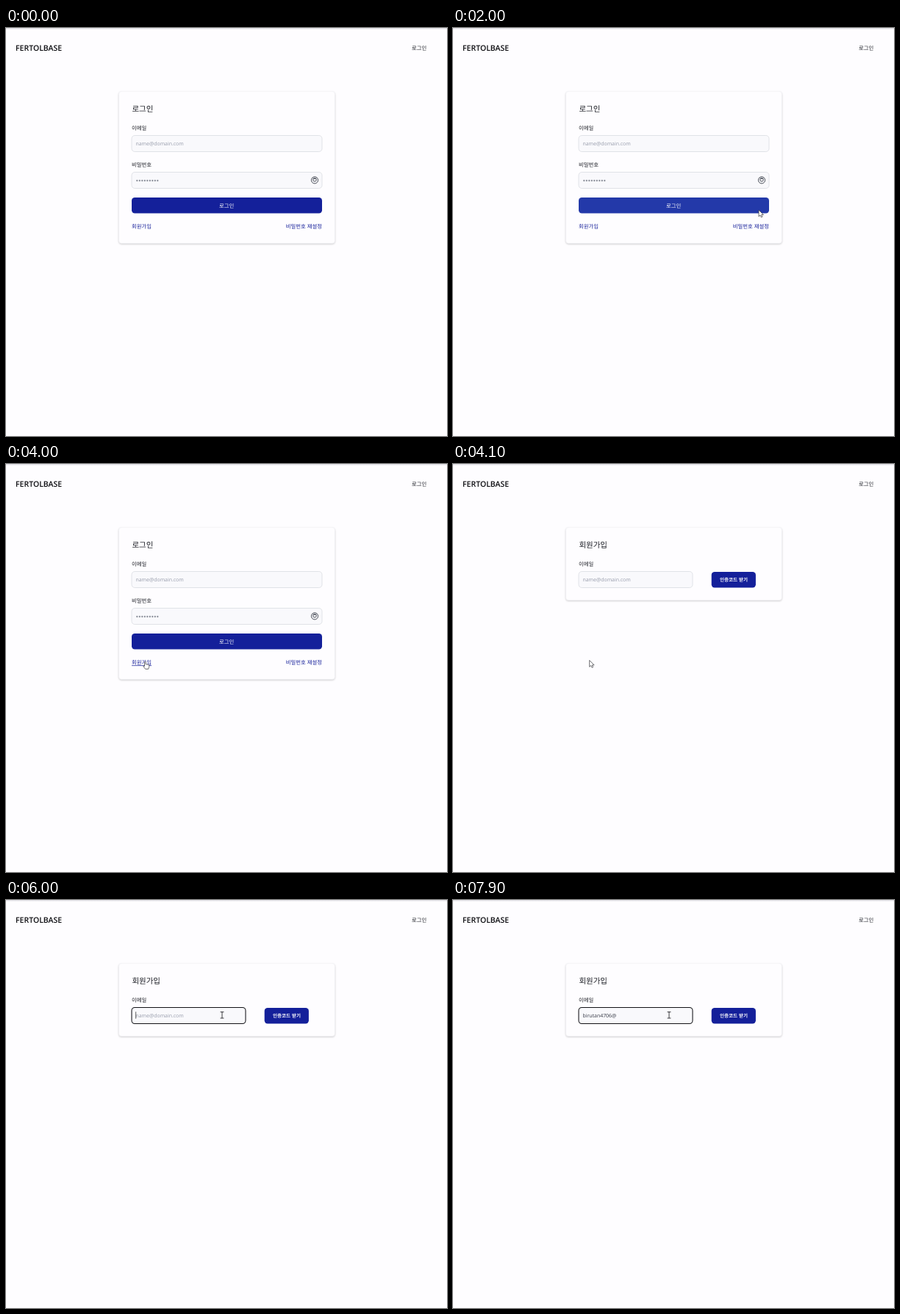
These frames come from a looping animation (600x556 px, 8000 ms). An HTML page:

```html
<!DOCTYPE html>
<html lang="ko">
<head>
<meta charset="utf-8">
<title>로그인</title>
<style>
  html, body { margin: 0; width: 100%; height: 100%; overflow: hidden; background: #fefdff; }
  svg { display: block; width: 100%; height: 100%; }
  text { font: 500 7.35px "Noto Sans CJK KR", "Noto Sans CJK", sans-serif; fill: #1b1d24; text-rendering: geometricPrecision; }
  .brand { font: 600 10.5px "Open Sans", sans-serif; fill: #0c0c10; }
  .nav { font-weight: 400; }
  .title { font-size: 10.5px; font-weight: 400; }
  .latin { font: 400 6.95px "Open Sans", sans-serif; }
  .hint { fill: #979cab; }
  .typed { fill: #343844; }
  .link { fill: #17219a; font-weight: 400; }
  .link.on { text-decoration: underline; }
  .label { fill: #fff; text-anchor: middle; }
  .small { font-size: 6.55px; font-weight: 700; }
  .card { fill: #fefdff; stroke: #ececf0; stroke-width: .5; filter: drop-shadow(0 1px 1.2px rgba(0, 0, 0, .19)); }
  .field { fill: #f9f9fc; stroke: #d6d8df; stroke-width: .7; }
  .field.on { stroke: #111116; stroke-width: 1.05; }
  .button { fill: #14209a; }
  .button.on { fill: #2339a9; }
  .icon { fill: none; stroke: #4c505a; }
  .pointer { fill: #fff; stroke: #3c3c42; stroke-width: .75; stroke-linejoin: round; }
</style>
</head>
<body>
<svg viewBox="0 0 600 556" preserveAspectRatio="none">
  <defs>
    <linearGradient id="edge" x2="0" y2="1">
      <stop stop-color="#dcdbe0"/><stop offset="1" stop-color="#fefdff"/>
    </linearGradient>
  </defs>
  <rect width="600" height="2.5" fill="url(#edge)"/>
  <text class="brand" x="13" y="30.7">FERTOLBASE</text>
  <text class="nav" x="552" y="29.8">로그인</text>

  <g id="login">
    <rect class="card" x="153.5" y="86.3" width="294" height="207.2" rx="4"/>
    <text class="title" x="171.4" y="114.1">로그인</text>
    <text x="171" y="138.8">이메일</text>
    <rect class="field" x="171" y="146.5" width="259" height="22" rx="4.2"/>
    <text class="latin hint" x="176.5" y="159.6">name@domain.com</text>
    <text x="171" y="188.8">비밀번호</text>
    <rect class="field" x="171" y="196.5" width="259" height="22" rx="4.2"/>
    <path d="M178.3 208H207" stroke="#8d919c" stroke-width="2.3" stroke-linecap="round" stroke-dasharray="0 3.5"/>
    <g class="icon">
      <circle cx="420" cy="207.3" r="4.6"/>
      <circle cx="420" cy="206.8" r="2.3"/>
      <path d="M417.7 205.2H422.3"/>
    </g>
    <rect id="submit" class="button" x="171" y="231" width="259" height="21.6" rx="4.2"/>
    <text class="label" x="300.2" y="244.6">로그인</text>
    <text id="join" class="link" x="171" y="273.4">회원가입</text>
    <text class="link" x="430" y="273.4" text-anchor="end">비밀번호 재설정</text>
  </g>

  <g id="signup">
    <rect class="card" x="153.5" y="86.3" width="294" height="99.4" rx="4"/>
    <text class="title" x="171.4" y="114.1">회원가입</text>
    <text x="171" y="138.8">이메일</text>
    <rect id="email" class="field" x="171" y="146.5" width="155" height="22" rx="4.2"/>
    <text id="hint" class="latin hint" x="176.5" y="159.6">name@domain.com</text>
    <text id="typed" class="latin typed" x="176.5" y="159.6"></text>
    <rect id="caret" y="152.3" width=".7" height="9.4" fill="#222"/>
    <rect class="button" x="351.7" y="146.9" width="60.2" height="21.5" rx="4.2"/>
    <text class="label small" x="382" y="160">인증코드 받기</text>
  </g>

  <g id="cursor">
    <path id="arrow" class="pointer" d="M0 0V8.9L2 7.1L3.4 10L4.9 9.3L3.6 6.5H6.4Z"/>
    <path id="hand" class="pointer" transform="translate(3.6 1.3)" d="M-.8 .9Q0-.4 .8 .9V4L4.4 4.6Q5.4 4.8 5.4 5.7V7.6L4.4 10.6H.4L-2.4 7.1Q-2.6 5.7-.8 6.7Z"/>
    <path id="beam" fill="none" stroke="#26262c" stroke-width=".9" d="M-2.4-4.2H2.4M-2.4 4.2H2.4M0-4.2V4.2"/>
  </g>
</svg>
<script>
const $ = id => document.getElementById(id);
const LOOP = 8000, STEP = 100;
const EMAIL = 'birutan4706@';
const ENTER = 1400, HOVER = 3100, JOIN = 4100, FIELD = 4800, FOCUS = 4900;

// stops of the pointer: time, x, y
const STOPS = [
  [ENTER, 555, 278], [2000, 416, 248], [2200, 416, 257], [2400, 265, 258.7], [2700, 100, 282],
  [HOVER, 185.7, 267.5], [JOIN, 185.7, 267.5], [FIELD, 294, 160], [5100, 294, 156.8]
];

const show = (id, on) => { $(id).style.display = on ? '' : 'none'; };
const mark = (id, on) => $(id).classList.toggle('on', on);
const between = (t, a, b) => t >= a && t < b;
const clamp = k => Math.min(1, Math.max(0, k));
const ease = k => k * k * (3 - 2 * k);

function pointerAt(t) {
  let [last, x, y] = STOPS[0];
  for (const [at, nextX, nextY] of STOPS.slice(1)) {
    const k = ease(clamp((t - last) / (at - last)));
    x += (nextX - x) * k;
    y += (nextY - y) * k;
    last = at;
  }
  return [x, y];
}

// characters typed in one burst that begins at start and lasts some steps
const burst = (t, start, steps, chars) =>
  Math.round(chars * clamp((t - start + STEP) / (steps * STEP)));

const typedAt = t =>
  burst(t, 6300, 1, 1) + burst(t, 6500, 4, 6) + burst(t, 7000, 3, 4) + burst(t, 7400, 1, 1);

function draw(t) {
  show('login', t < JOIN);
  show('signup', t >= JOIN);

  const [x, y] = pointerAt(t);
  const overLink = between(t, HOVER, JOIN), overField = t >= FIELD;
  $('cursor').setAttribute('transform', `translate(${x} ${y})`);
  show('cursor', t >= ENTER);
  show('hand', overLink);
  show('beam', overField);
  show('arrow', !overLink && !overField);
  mark('join', overLink);
  mark('submit', between(x, 171, 430) && between(y, 231, 252.6));

  const count = typedAt(t);
  $('typed').textContent = EMAIL.slice(0, count);
  show('hint', !count);
  mark('email', t >= FOCUS);
  show('caret', between(t, FOCUS, 5400) || between(t, 6000, 7900));
  $('caret').setAttribute('x', 176.4 + (count ? $('typed').getComputedTextLength() : 0));
}

function tick() {
  draw(Math.floor(performance.now() % LOOP / STEP) * STEP);
  requestAnimationFrame(tick);
}
tick();
</script>
</body>
</html>
```
